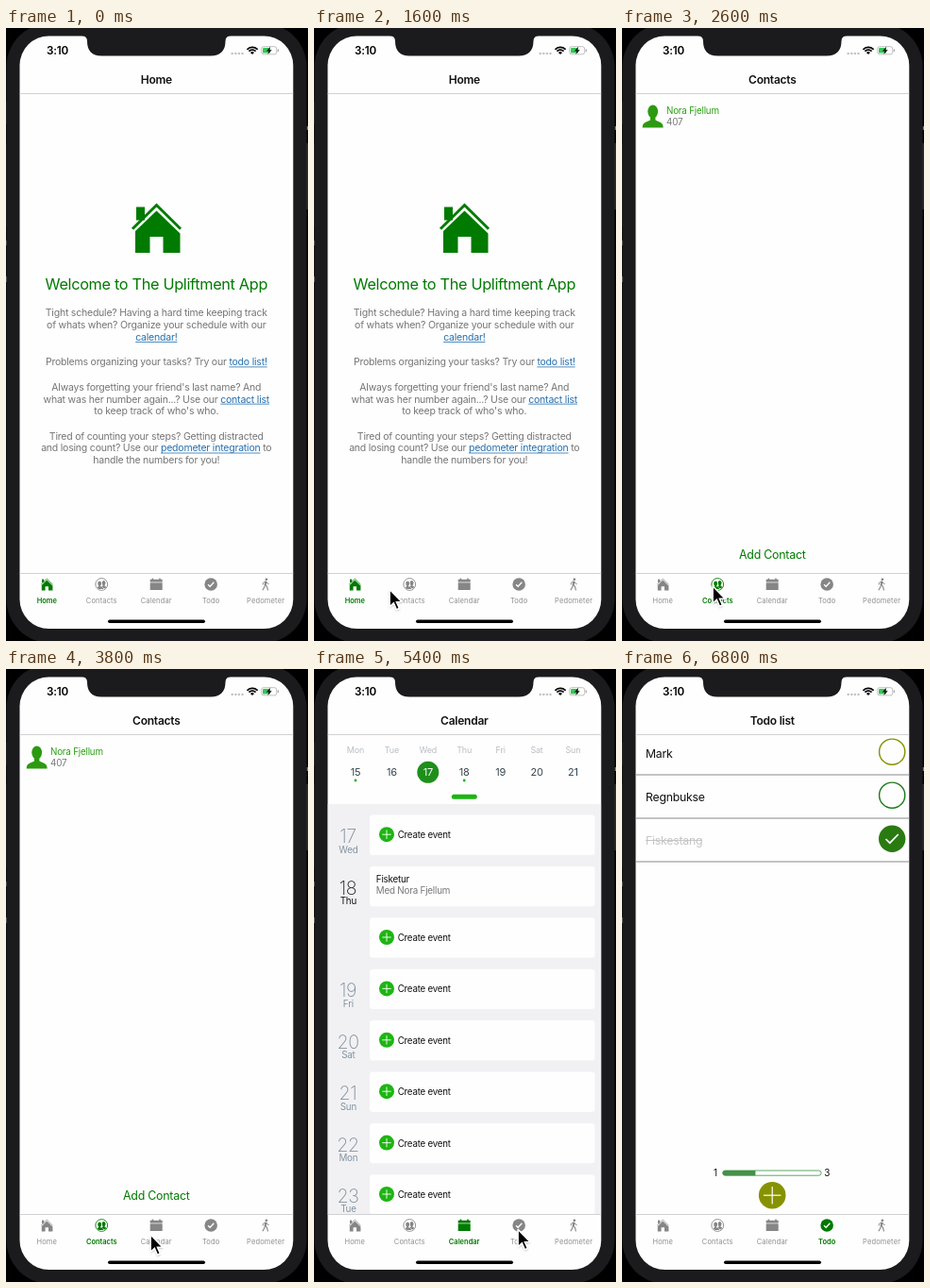
Write an HTML page with a canvas that moves like this. It is 320 px wide and 649 px high and loops after 6900 ms.

```html
<!DOCTYPE html>
<html lang="en">
<head>
<meta charset="utf-8">
<title>Phone app demo</title>
<style>
html, body { margin: 0; width: 100%; height: 100%; overflow: hidden; background: #000; }
canvas { display: block; width: 320px; height: 649px; }
</style>
</head>
<body>
<canvas id="stage"></canvas>
<script>
const W = 320, H = 649, LOOP = 6900, STEP = 100, MID = 159.3;
const GREEN = '#007a00', LIME = '#1db512', GREY = '#868686', INK = '#111';
const PERSON = 'Nora Fjellum';
const canvas = document.getElementById('stage');
const c = canvas.getContext('2d');
const dpr = window.devicePixelRatio || 1;
canvas.width = W * dpr;
canvas.height = H * dpr;

// ---------- helpers ----------
function setFont(size, weight = 400, track = -0.02) {
  c.font = `${weight} ${size}px Inter, "Open Sans", sans-serif`;
  c.letterSpacing = (size * track).toFixed(3) + 'px';
}
function text(s, x, y, size, color, { weight, align = 'left', track } = {}) {
  setFont(size, weight, track);
  c.textAlign = align;
  c.fillStyle = color;
  c.fillText(s, x, y);
}
function rect(x, y, w, h, color) {
  c.fillStyle = color;
  c.fillRect(x, y, w, h);
}
function round(x, y, w, h, r, color) {
  c.beginPath();
  c.roundRect(x, y, w, h, r);
  c.fillStyle = color;
  c.fill();
}
function disc(x, y, r, color) {
  c.beginPath();
  c.arc(x, y, r, 0, 7);
  c.fillStyle = color;
  c.fill();
}
function ring(x, y, r, width, color) {
  c.beginPath();
  c.arc(x, y, r, 0, 7);
  c.lineWidth = width;
  c.strokeStyle = color;
  c.stroke();
}
function line(points, width, color) {
  c.beginPath();
  points.forEach(p => c.lineTo(...p));
  c.lineWidth = width;
  c.strokeStyle = color;
  c.stroke();
}
function poly(points, color) {
  c.beginPath();
  points.forEach(p => c.lineTo(...p));
  c.closePath();
  c.fillStyle = color;
  c.fill();
}
function plus(x, y, r, width) {
  line([[x - r, y], [x + r, y]], width, '#fff');
  line([[x, y - r], [x, y + r]], width, '#fff');
}
function at(x, y, scale, draw) {
  c.save();
  c.translate(x, y);
  c.scale(scale, scale);
  draw();
  c.restore();
}

// ---------- icons, drawn around 0,0 ----------
function house(color) {
  rect(-21.5, -22, 9, 14, color);
  line([[-25.5, 1.2], [0, -24], [25.5, 1.2]], 3, color);
  poly([[0, -18], [25, 6], [25, 26.5], [7, 26.5], [7, 9.5], [-7, 9.5], [-7, 26.5], [-22.5, 26.5], [-22.5, 3.6]], color);
}
function bust(x, y, s, color) {
  at(x, y, s, () => {
    c.beginPath();
    c.ellipse(0, -5, 5.4, 7, 0, 0, 7);
    c.fillStyle = color;
    c.fill();
    rect(-2.7, 0, 5.4, 6, color);
    c.beginPath();
    c.moveTo(-11, 12);
    c.bezierCurveTo(-11, 6, -7, 6.5, -2.7, 4);
    c.lineTo(2.7, 4);
    c.bezierCurveTo(7, 6.5, 11, 6, 11, 12);
    c.fill();
  });
}
const icons = {
  home: color => at(0, 0, 0.245, () => house(color)),
  contacts(color) {
    ring(0, 0, 6.4, 0.9, color);
    c.save();
    c.beginPath();
    c.arc(0, 0, 5.8, 0, 7);
    c.clip();
    bust(2.3, 0.2, 0.36, color);
    bust(-2, 0.6, 0.42, '#fff');
    bust(-2.1, 0.7, 0.36, color);
    c.restore();
  },
  calendar(color) {
    rect(-6.5, -5.2, 13, 2.8, color);
    rect(-4.6, -6.4, 1.6, 2, color);
    rect(3, -6.4, 1.6, 2, color);
    rect(-6.5, -1.7, 13, 7.7, color);
  },
  todo(color) {
    disc(0, 0, 6.8, color);
    line([[-3.1, 0.2], [-1, 2.3], [3.2, -2.2]], 1.3, '#fff');
  },
  walk(color) {
    disc(0.8, -5.2, 1.35, color);
    line([[0.3, -3.3], [-0.5, 1]], 2, color);
    line([[0, -3], [-2.6, -1.8], [-3, 0.4]], 0.9, color);
    line([[0.7, -3], [1.8, -1], [3.6, -0.3]], 0.9, color);
    line([[-0.6, 0.5], [-1.4, 3], [-3.2, 6.3]], 1.1, color);
    line([[-0.2, 0.5], [1.5, 2.6], [2.4, 6.3]], 1.1, color);
  }
};
const tabs = [
  ['Home', 'home', 'Home'], ['Contacts', 'contacts', 'Contacts'],
  ['Calendar', 'calendar', 'Calendar'], ['Todo', 'todo', 'Todo list'], ['Pedometer', 'walk', '']
];

// ---------- phone ----------
function phone() {
  rect(0, 0, W, H, '#000');
  rect(0, 78, 1, 24, '#222');
  rect(0, 122, 1, 88, '#161616');
  rect(0, 225, 1.2, 5, '#777');
  rect(0, 263, 1, 6, '#888');
  rect(317, 122, 3, 70, '#2a2a2c');
  rect(318.6, 104, 1.4, 4, '#777');
  round(0.5, -5, 318, 656, 46, '#1b1a1c');
  round(14.5, 8.5, 289.8, 627.5, 31, '#fefefe');
}
function notch() {
  c.beginPath();
  c.moveTo(80, 8);
  c.quadraticCurveTo(86, 8.5, 86, 14);
  c.bezierCurveTo(86, 24, 91, 29.5, 101, 29.5);
  c.lineTo(217, 29.5);
  c.bezierCurveTo(227, 29.5, 232.5, 24, 232.5, 14);
  c.quadraticCurveTo(232.5, 8.5, 238.5, 8);
  c.closePath();
  c.fillStyle = '#1b1a1c';
  c.fill();
}
function statusBar() {
  text('3:10', 43, 28, 11.7, '#000', { weight: 600 });
  for (let i = 0; i < 4; i++) disc(239.7 + i * 3.6, 27, 1.25, '#c2c2c4');
  c.lineCap = 'butt';
  [[7.6, 1.7], [4.9, 1.6]].forEach(([r, w]) => {
    c.beginPath();
    c.arc(261, 28, r, -Math.PI * 0.76, -Math.PI * 0.24);
    c.lineWidth = w;
    c.strokeStyle = '#000';
    c.stroke();
  });
  c.beginPath();
  c.moveTo(261, 28);
  c.arc(261, 28, 2.8, -Math.PI * 0.76, -Math.PI * 0.24);
  c.fillStyle = '#000';
  c.fill();
  c.beginPath();
  c.roundRect(270.7, 19.7, 16, 8.2, 2.3);
  c.lineWidth = 0.7;
  c.strokeStyle = '#a5a5a7';
  c.stroke();
  round(272, 21, 8, 5.6, 1.2, '#34c759');
  round(287.7, 22.3, 1.2, 3, 0.6, '#a5a5a7');
  poly([[280.2, 19.8], [275.8, 24.4], [278.4, 24.4], [277.2, 28], [281.8, 23.2], [279.2, 23.2]], '#111');
}
function chrome(active) {
  statusBar();
  text(tabs[active][2], MID, 58.7, 12, INK, { weight: 600, align: 'center' });
  rect(14.5, 69, 289.8, 0.8, '#c6c6c8');
  rect(14.5, 577, 289.8, 0.8, '#c6c6c8');
  tabs.forEach(([label, icon], i) => {
    const x = 43.3 + 57.95 * i, on = i === active;
    at(x, 589, 1, () => icons[icon](on ? GREEN : GREY));
    text(label, x, 608.8, 7.5, on ? GREEN : '#8e8e90', { weight: on ? 600 : 400, align: 'center', track: on ? 0 : 0.02 });
  });
  round(108, 626.4, 103, 3.6, 1.8, '#000');
}

// ---------- screens ----------
// Parts between underscores are links.
const intro = [
  [301.5, 'Tight schedule? Having a hard time keeping track'],
  [314.3, 'of whats when? Organize your schedule with our'],
  [327, '_calendar!_'],
  [353.5, 'Problems organizing your tasks? Try our _todo list!_'],
  [380, "Always forgetting your friend's last name? And"],
  [392.7, 'what was her number again...? Use our _contact list_'],
  [405.4, "to keep track of who's who."],
  [432, 'Tired of counting your steps? Getting distracted'],
  [444.6, 'and losing count? Use our _pedometer integration_ to'],
  [457.3, 'handle the numbers for you!']
];
function homeScreen() {
  at(159.5, 211.5, 1, () => house(GREEN));
  text('Welcome to The Upliftment App', MID, 277.3, 16.3, GREEN, { align: 'center' });
  for (const [y, s] of intro) {
    setFont(10.5);
    let x = MID - c.measureText(s.replace(/_/g, '')).width / 2;
    s.split('_').forEach((part, i) => {
      const link = i % 2, color = link ? '#2570ae' : '#757577';
      text(part, x, y + 3.8, 10.5, color);
      const w = c.measureText(part).width;
      if (link) rect(x, y + 5, w, 0.8, color);
      x += w;
    });
  }
}
function contactsScreen() {
  bust(32.7, 93.5, 1, '#2c9a10');
  text(PERSON, 47, 91.3, 9.8, '#2ba012');
  text('407', 47, 103.4, 9.8, '#757577');
  text('Add Contact', MID, 562.2, 12.4, GREEN, { align: 'center' });
}
const week = ['Mon', 'Tue', 'Wed', 'Thu', 'Fri', 'Sat', 'Sun'];
function calendarScreen() {
  week.forEach((day, i) => {
    const x = 44 + 38.4 * i, on = i === 2;
    text(day, x, 89.2, 9, '#b9bec4', { align: 'center' });
    if (on) disc(x, 109.3, 11.5, '#1f8f1c');
    text(15 + i, x, 113.2, 11, on ? '#fff' : '#38444e', { align: 'center' });
    if (i === 0 || i === 3) disc(x, 118, 1.4, LIME);
  });
  round(145.8, 132.8, 27, 5, 2.5, LIME);
  c.save();
  c.beginPath();
  c.rect(14.5, 143, 289.8, 434);
  c.clip();
  rect(14.5, 143, 289.8, 434, '#f1f1f4');
  for (let i = 0; i < 8; i++) {
    const y = 154.5 + 54.4 * i;
    round(59, y, 238.6, 42.4, 3.5, '#fefefe');
    if (i === 1) {
      text('Fisketur', 65.8, y + 16.6, 9.8, INK);
      text('Med ' + PERSON, 65.8, y + 28.6, 9.8, '#77777a');
    } else {
      disc(77, y + 20.7, 8, LIME);
      plus(77, y + 20.7, 4.7, 0.9);
      text('Create event', 88.7, y + 24.7, 9.7, INK);
    }
    if (i === 2) continue;
    const n = i < 2 ? i : i - 1, next = i === 1;
    text(17 + n, 36, y + 29.7, 19.6, next ? '#222' : '#7f8c96', { weight: 200, align: 'center' });
    text(week[(n + 2) % 7], 36.4, y + 40, 9.8, next ? INK : '#82939f', { align: 'center' });
  }
  c.restore();
}
function todoScreen() {
  const OLIVE = '#879200', DARK = '#1f7a1c';
  ['Mark', 'Regnbukse', 'Fiskestang'].forEach((item, i) => {
    const y = 88 + 46 * i, done = i === 2;
    text(item, 25, y + 5.6, 12.3, done ? '#c6c6c8' : INK);
    if (done) {
      rect(25, y + 1, c.measureText(item).width, 0.8, '#c0c0c2');
      disc(286.2, y - 0.3, 14.2, '#2a7a12');
      line([[279.5, 180], [283.8, 184.2], [292.8, 175]], 1.7, '#fff');
    } else {
      ring(286.2, y - 0.3, 13.6, 1.4, i ? DARK : OLIVE);
    }
    rect(14.5, y + 23.5, 289.8, 1, '#8c8c8e');
  });
  text('1', 97, 537.2, 10, INK);
  text('3', 214.3, 537.2, 10, INK);
  c.save();
  c.beginPath();
  c.roundRect(106.7, 531, 104.4, 5.2, 2.6);
  c.lineWidth = 0.9;
  c.strokeStyle = '#4c9f50';
  c.stroke();
  c.clip();
  rect(106, 530, 35.4, 7, '#45904a');
  c.restore();
  disc(159.2, 557.2, 14.3, OLIVE);
  plus(159.2, 557.2, 9.2, 1.2);
}
const screens = [homeScreen, contactsScreen, calendarScreen, todoScreen];
const switches = [0, 2400, 4300, 5900];

// ---------- pointer: time, x, y ----------
const path = [
  [1500, 75, 634], [1600, 80, 594], [2000, 95, 590], [2600, 96, 590.5], [2900, 98, 593],
  [3400, 146, 603], [3800, 153, 598.5], [4200, 158, 592.5], [4900, 159, 594],
  [5300, 214, 595], [5400, 216, 593], [6300, 217, 594], [6700, 228, 652]
];
function pointer(t) {
  const i = path.findIndex(p => p[0] > t);
  if (i < 1) return;
  const [t0, x0, y0] = path[i - 1], [t1, x1, y1] = path[i];
  const u = (t - t0) / (t1 - t0), k = u * u * (3 - 2 * u);
  at(x0 + (x1 - x0) * k, y0 + (y1 - y0) * k, 1, () => {
    const arrow = [[0, 0], [0, 19.2], [4.3, 15.2], [7.3, 22.2], [10.8, 20.7], [7.8, 13.9], [13.6, 13.9]];
    c.lineJoin = 'round';
    c.shadowColor = 'rgba(0,0,0,.35)';
    c.shadowBlur = 2 * dpr;
    c.shadowOffsetY = dpr;
    poly(arrow, '#fff');
    c.shadowColor = 'transparent';
    line([...arrow, [0, 0]], 1.3, '#fff');
    poly([[0.9, 2.3], [0.9, 17], [4.6, 13.6], [7.8, 20.8], [9.4, 20.1], [6.3, 12.9], [11.4, 12.9]], '#000');
  });
}

function draw(now) {
  const t = Math.floor((now % LOOP) / STEP) * STEP;
  const active = switches.filter(s => s <= t).length - 1;
  c.setTransform(dpr, 0, 0, dpr, 0, 0);
  c.lineJoin = 'miter';
  phone();
  screens[active]();
  chrome(active);
  notch();
  pointer(t);
}
let start;
function frame(now) {
  start ??= now;
  draw(now - start);
  requestAnimationFrame(frame);
}
draw(0);
requestAnimationFrame(frame);
</script>
</body>
</html>
```
